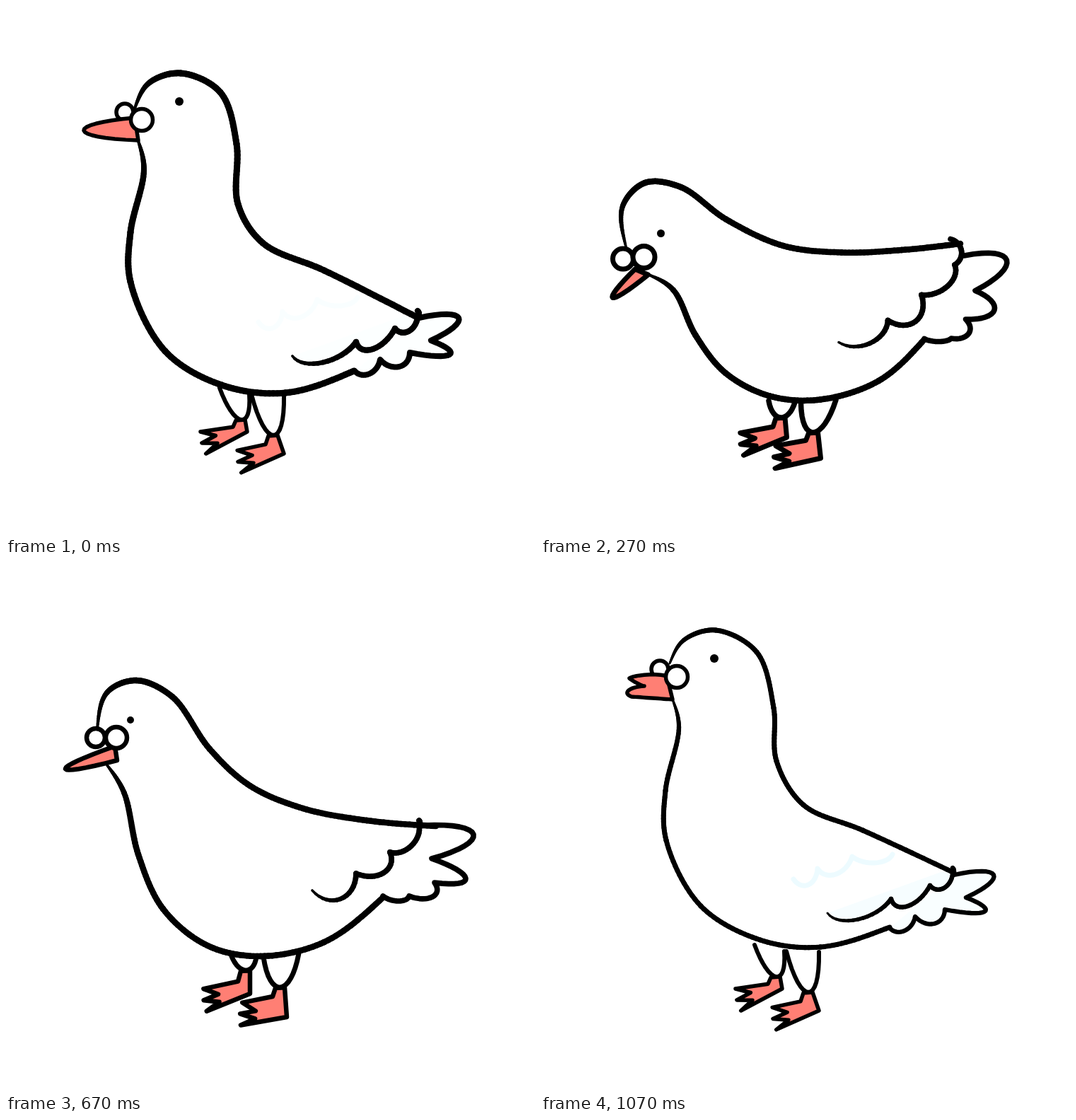
Recreate the animation shown at these times as an HTML page with a canvas. Size 748 by 748 pixels, loop 1170 ms.

```html
<!DOCTYPE html>
<html lang="en">
<head>
<meta charset="utf-8">
<title>Pecking bird</title>
<style>
  html, body { margin: 0; width: 100%; height: 100%; overflow: hidden; background: #fff; }
  canvas { display: block; width: 748px; height: 748px; }
</style>
</head>
<body>
<canvas id="stage" width="748" height="748"></canvas>
<script>
const ctx = document.getElementById('stage').getContext('2d');
const CORAL = '#ff7f74', STEPS = 16;

// back, front: points of a smooth line.
// wing, tail, beak: a start, then an apex and an end for every lobe.
// legs: both hip points, ankle, heel, and the angle of the upper toe.
const stand = {
  back: [182,145, 202,109, 247,95, 303,122, 326,195, 328,280, 363,335, 450,374, 581,440],
  front: [187,191, 195,232, 176,320, 176,390, 225,488, 305,536, 395,547, 492,516],
  wing: [405,495, 448,504, 495,475, 519,485, 550,456, 569,460, 582,440, 584,436, 582,431],
  tail: [584,441, 640,441, 601,473, 627,493, 571,490, 556,510, 529,500, 514,520, 493,516],
  beak: [182,158, 110,176, 187,190],
  ceres: [[168, 150, 12], [192, 161, 15.5]],
  eye: [245, 135, 6],
  legs: [[302,540, 344,549, 332,585, 341,602, 0], [347,549, 393,550, 378,607, 393,633, -4]],
  pen: 9, nib: 5.5, tint: 0.2
};

const stoop = {
  back: [129,235, 143,183, 184,166, 235,189, 288,263, 345,315, 420,347, 510,364, 608,372],
  front: [143,286, 167,325, 187,412, 222,489, 285,541, 360,556, 450,536, 533,473],
  wing: [433,463, 473,475, 495,439, 534,438, 543,409, 573,400, 584,370, 585,367, 584,364],
  tail: [590,371, 661,384, 602,418, 650,446, 606,452, 603,472, 570,471, 555,478, 533,471],
  beak: [154,259, 84,291, 157,279],
  ceres: [[127, 247, 13], [156, 247, 15]],
  eye: [176, 222, 5],
  legs: [[319,556, 354,557, 339,576, 345,609, -6], [364,557, 414,552, 388,600, 397,642, -18]],
  pen: 8.5, nib: 6.5, tint: 0
};

const peck = {
  back: [111,445, 88,383, 110,334, 160,323, 235,340, 340,363, 430,350, 510,326, 578,300],
  front: [164,475, 207,478, 250,519, 300,549, 362,562, 430,557, 505,524, 551,470],
  wing: [409,488, 457,479, 486,450, 525,454, 533,408, 577,392, 586,362, 604,325, 574,295],
  tail: [607,335, 656,335, 626,387, 632,414, 595,434, 606,455, 590,469, 571,471, 551,470],
  beak: [112,485, 119,534, 146,481],
  ceres: [[105, 468, 16], [135, 463, 16]],
  eye: [163, 421, 6],
  legs: [[325,561, 364,564, 339,588, 350,611, -5], [371,566, 420,562, 383,606, 394,637, -13]],
  pen: 8.5, nib: 7.5, tint: 0
};

const low = {
  back: [133,495, 97,420, 122,354, 175,338, 240,354, 310,374, 400,376, 490,356, 580,324],
  front: [180,502, 204,495, 250,532, 320,565, 400,576, 475,560, 530,513, 553,446],
  wing: [455,469, 486,476, 507,450, 542,426, 532,394, 564,374, 587,342, 593,327, 580,324],
  tail: [588,352, 645,336, 624,381, 636,401, 593,417, 594,434, 578,444, 566,448, 553,446],
  beak: [147,517, 177,565, 180,505],
  ceres: [[137, 508, 13], [159, 497, 15]],
  eye: [162, 459, 5],
  legs: [[325,570, 363,575, 336,595, 347,612, -8], [366,576, 421,578, 385,609, 390,638, -15]],
  pen: 8.5, nib: 6.5, tint: 0
};

const coo = {
  ...stand,
  back: [182,142, 202,109, 247,95, 305,126, 329,205, 333,280, 371,342, 455,378, 582,437],
  front: [186,193, 195,232, 176,322, 177,392, 226,485, 310,533, 395,543, 493,515],
  beak: [178,160, 150,158, 125,163, 136,170, 146,174, 124,180, 128,189, 157,191, 186,193],
  pen: 7, tint: 0.6
};

const plume = [357,447, 378,455, 391,432, 417,440, 440,415, 472,424, 497,412];

function blend(a, b, t = 0.5) {
  if (typeof a === 'number') return a + (b - a) * t;
  if (Array.isArray(a)) return a.map((v, i) => blend(v, b[i], t));
  return Object.fromEntries(Object.keys(a).map(k => [k, blend(a[k], b[k], t)]));
}

const pairs = list => list.flatMap((x, i) => i % 2 ? [] : [[x, list[i + 1]]]);
const add = (a, b, s = 1) => [a[0] + b[0] * s, a[1] + b[1] * s];
const sub = (a, b) => add(a, b, -1);
const mid = (a, b) => blend(a, b);

function bezier(a, b, c, d) {
  return Array.from({ length: STEPS + 1 }, (_, i) => {
    const t = i / STEPS, u = 1 - t;
    return [0, 1].map(k => u * u * u * a[k] + 3 * u * u * t * b[k] + 3 * u * t * t * c[k] + t * t * t * d[k]);
  });
}

// Rounded lobe from p to q whose middle touches the apex.
function lobe(p, apex, q) {
  const peak = add(apex, sub(apex, mid(p, q)), 1 / 3), side = sub(q, p);
  return bezier(p, add(peak, side, -0.3), add(peak, side, 0.3), q);
}

function lobes(list) {
  const p = pairs(list), line = [];
  for (let i = 0; i + 2 < p.length; i += 2) line.push(...lobe(p[i], p[i + 1], p[i + 2]));
  return line;
}

// Centripetal spline through all points.
function smooth(list) {
  const p = pairs(list), last = p.length - 1;
  const gap = i => Math.sqrt(Math.hypot(...sub(p[i + 1], p[i])));
  const slope = i => sub(p[i + 1], p[i]).map(v => v / gap(i));
  const speed = p.map((_, i) => i && i < last
    ? blend(slope(i - 1), slope(i), gap(i - 1) / (gap(i - 1) + gap(i))) : null);
  const rest = (s, v) => add([s[0] * 1.5, s[1] * 1.5], v, -0.5);
  speed[0] = rest(slope(0), speed[1]);
  speed[last] = rest(slope(last - 1), speed[last - 1]);
  return p.slice(0, last).flatMap((a, i) => bezier(a,
    add(a, speed[i], gap(i) / 3), add(p[i + 1], speed[i + 1], -gap(i) / 3), p[i + 1]));
}

function trace(line) {
  ctx.beginPath();
  line.forEach(p => ctx.lineTo(...p));
}

function ink(line, width, color = '#000') {
  trace(line);
  ctx.strokeStyle = color;
  ctx.lineWidth = width;
  ctx.stroke();
}

// Line that starts thin and swells to its full width.
function swell(line, width) {
  for (let i = 1; i < line.length; i++) {
    const t = Math.min(1, i / line.length * 4);
    ink([line[i - 1], line[i]], width * (0.4 + 0.6 * t * (2 - t)));
  }
}

function fill(line, color) {
  trace(line);
  ctx.fillStyle = color;
  ctx.fill();
}

function patch(line, width) {
  fill(line, CORAL);
  ctx.closePath();
  ctx.lineWidth = width;
  ctx.strokeStyle = '#000';
  ctx.stroke();
}

function disc([x, y, r], color, edge) {
  ctx.beginPath();
  ctx.arc(x, y, r, 0, Math.PI * 2);
  ctx.fillStyle = color;
  ctx.fill();
  if (!edge) return;
  ctx.strokeStyle = '#000';
  ctx.lineWidth = edge;
  ctx.stroke();
}

function leg(spec, nib) {
  const [hipA, hipB, ankle, heel] = pairs(spec.slice(0, 8)), tilt = spec[8];
  // Toe tips and the notches between them fan out from the heel.
  const toes = Array.from({ length: 5 }, (_, i) => {
    const angle = (tilt + 7 * i) * Math.PI / 180, reach = i % 2 ? 45 : 66;
    return add(heel, [-Math.cos(angle), Math.sin(angle)], reach);
  });
  const instep = [ankle[0] - 11, blend(ankle[1], toes[0][1], 0.6)];
  patch([add(ankle, [-7, 1]), instep, ...toes, heel, add(ankle, [6, 0])], nib);
  ink(lobe(hipA, ankle, hipB), nib + 0.5);
}

function draw({ back, front, wing, tail, beak, ceres, eye, legs, pen, nib, tint }) {
  ctx.lineCap = ctx.lineJoin = 'round';
  ctx.fillStyle = '#fff';
  ctx.fillRect(0, 0, 748, 748);
  const wingLine = lobes(wing), tailLine = lobes(tail);
  const shade = a => `rgba(225,249,255,${a})`;
  fill(wingLine, shade(tint / 2));
  fill(tailLine, shade(tint / 3));
  ink(lobes(plume), 7, shade(tint));
  legs.forEach(spec => leg(spec, nib));
  ink(tailLine, pen * 0.9);
  swell(wingLine, pen * 0.9);
  swell(smooth(front), pen);
  swell(smooth(back), pen);
  disc(ceres[0], '#fff', nib);
  patch(lobes(beak), nib);
  disc(ceres[1], '#fff', nib);
  disc(eye, '#000');
}

const poses = [
  stand, blend(stand, stoop), stoop, blend(stoop, peck), peck, blend(peck, low), low,
  stoop, stand, coo, stand, coo
];
let shown;

// The first pose holds 70 ms, every other one 100 ms.
function tick() {
  const pose = poses[Math.floor((performance.now() % 1170 + 30) / 100)];
  if (pose !== shown) draw(shown = pose);
  requestAnimationFrame(tick);
}
tick();
</script>
</body>
</html>
```
